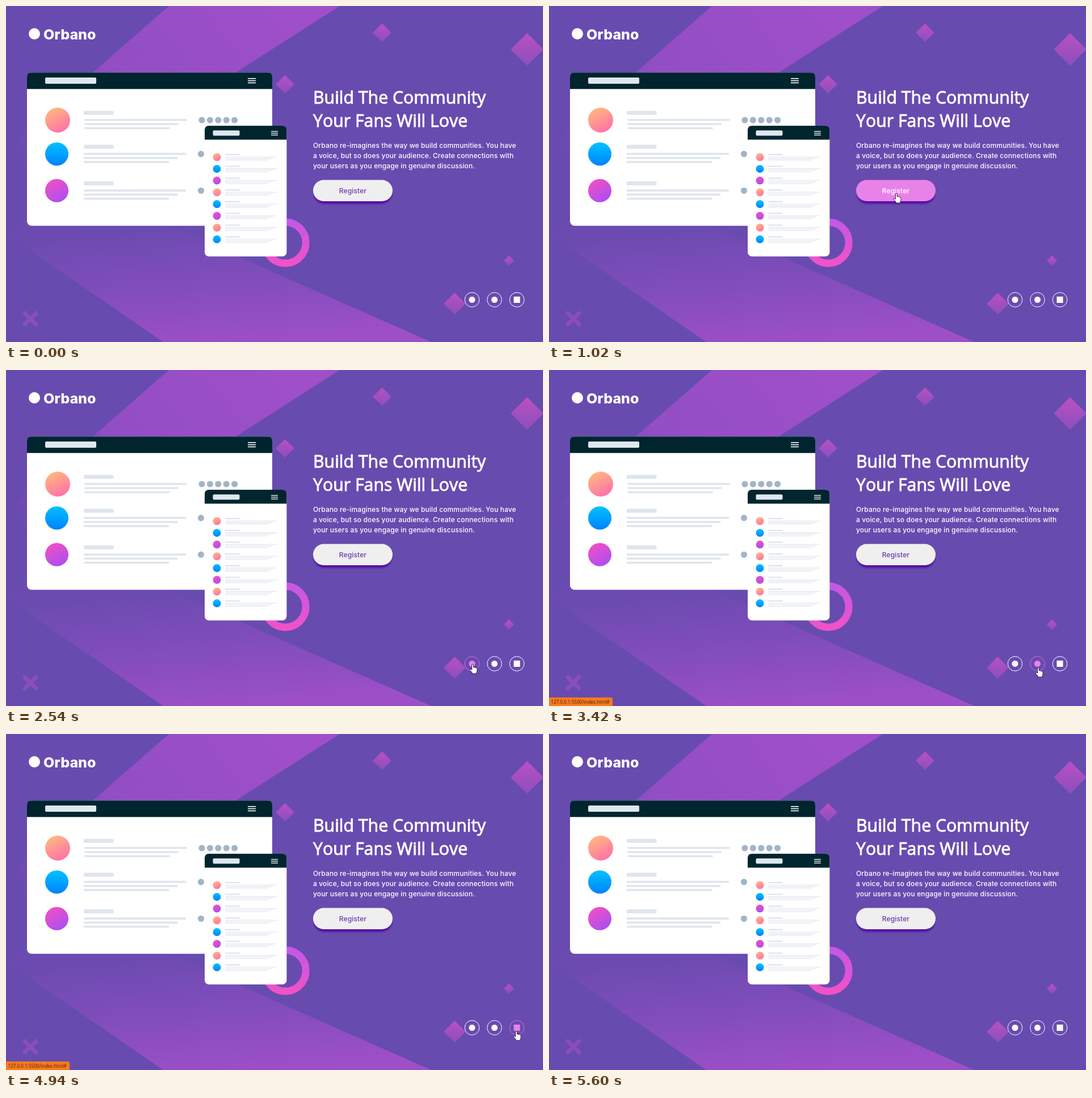
An HTML page that plays this animation: 946x592 px, repeating every 5.67 s.

```html
<!DOCTYPE html>
<html lang="en">
<head>
<meta charset="utf-8">
<title>Landing page</title>
<style>
  html, body { margin: 0; width: 100%; height: 100%; overflow: hidden; background: #684baf; }
  svg { display: block; width: 946px; height: 592px; }
  text { fill: #fff; font-family: Inter, sans-serif; }
  .logo { font-size: 25px; font-weight: 800; }
  .title { font: 400 30.25px "Open Sans", sans-serif; font-kerning: none; stroke: #fff; stroke-width: .9px; }
  .body { font-size: 12px; font-weight: 500; letter-spacing: .13px; }
  .status { font: 8.1px "Open Sans", sans-serif; fill: #3a2418; }
</style>
</head>
<body>
<svg id="stage" viewBox="0 0 946 592">
  <defs>
    <linearGradient id="top" gradientUnits="userSpaceOnUse" x1="470" y1="0" x2="60" y2="320">
      <stop offset="0" stop-color="#9e4fc9"/><stop offset=".55" stop-color="#924ec4"/><stop offset="1" stop-color="#684baf"/>
    </linearGradient>
    <linearGradient id="low" gradientUnits="userSpaceOnUse" x1="330" y1="385" x2="350" y2="600">
      <stop offset="0" stop-color="#6b4bb0"/><stop offset=".5" stop-color="#824dbc"/><stop offset="1" stop-color="#9d4fc8"/>
    </linearGradient>
    <linearGradient id="gem" x1="0" y1="0" x2="0" y2="1">
      <stop offset="0" stop-color="#b950c4"/><stop offset="1" stop-color="#8c4fbb"/>
    </linearGradient>
    <linearGradient id="ring" x1="0" y1="0" x2="0" y2="1">
      <stop offset="0" stop-color="#c458e4"/><stop offset="1" stop-color="#f052c8"/>
    </linearGradient>
    <linearGradient id="orange" x1=".2" y1="0" x2=".7" y2="1">
      <stop offset="0" stop-color="#ffbb7c"/><stop offset="1" stop-color="#ff70aa"/>
    </linearGradient>
    <linearGradient id="blue" x1="0" y1="0" x2="0" y2="1">
      <stop offset="0" stop-color="#00c2ff"/><stop offset="1" stop-color="#0082fd"/>
    </linearGradient>
    <linearGradient id="pink" x1=".2" y1="0" x2=".7" y2="1">
      <stop offset="0" stop-color="#f44fc2"/><stop offset="1" stop-color="#aa4ff2"/>
    </linearGradient>
    <filter id="soft" x="-20%" y="-40%" width="140%" height="200%"><feGaussianBlur stdDeviation="1.6"/></filter>
  </defs>

  <path fill="url(#top)" d="M287 0H588L408 115L60 337L0 251Z"/>
  <path fill="url(#low)" d="M0 401L120 310L290 389L749 592H277Z"/>
  <g id="gems" fill="url(#gem)"></g>
  <path d="M33 541L53 561M53 541L33 561" stroke="#8a4dbe" stroke-width="7" stroke-linecap="round"/>
  <circle cx="492" cy="417" r="36.2" fill="none" stroke="url(#ring)" stroke-width="13"/>

  <g id="desk"></g>
  <g id="phone"></g>

  <circle cx="50" cy="49" r="10" fill="#fff"/>
  <text class="logo" x="66" y="58.5">Orbano</text>

  <text class="title" x="541" y="172">Build The Community</text>
  <text class="title" x="541" y="213">Your Fans Will Love</text>
  <text class="body" x="541" y="250">Orbano re-imagines the way we build communities. You have</text>
  <text class="body" x="541" y="268">a voice, but so does your audience. Create connections with</text>
  <text class="body" x="541" y="286">your users as you engage in genuine discussion.</text>

  <rect x="542" y="311" width="138" height="37.5" rx="18.7" fill="#5210a2" filter="url(#soft)"/>
  <rect id="button" x="541" y="306.5" width="140" height="37.5" rx="18.7"/>
  <text id="label" class="body" x="611" y="330" text-anchor="middle">Register</text>

  <g id="social"></g>

  <g id="status">
    <path fill="#fa7a1e" d="M0 577H109Q112 577 112 580V592H0Z"/>
    <text class="status" x="3.5" y="587.5">127.0.0.1:5500/index.html#</text>
  </g>

  <g id="cursor" fill="#fff" stroke="#1c1630" stroke-width=".9" stroke-linejoin="round">
    <path id="arrow" d="M0 0V12.2L2.8 9.6L4.8 14.2L6.7 13.3L4.7 8.9H8.4Z"/>
    <path id="hand" d="M-1.4 1Q0 -1 1.4 1V6Q3 5 4 6.4Q5.6 5.6 6.3 7.1Q8 6.8 8 8.6V12Q8 14 6.7 15.5V17H-.7V15.6L-4.4 11Q-5.4 9.2 -3.8 8.8Q-2.6 8.8 -1.4 10.4Z"/>
  </g>
</svg>
<script>
const LOOP = 5670;
const $ = id => document.getElementById(id);

function add(parent, tag, attrs) {
  const el = document.createElementNS("http://www.w3.org/2000/svg", tag);
  for (const key in attrs) el.setAttribute(key, attrs[key]);
  return parent.appendChild(el);
}
const bar = (g, x, y, width, height, fill, rx = height / 2) =>
  add(g, "rect", { x, y, width, height, rx, fill });
const dot = (g, cx, cy, r, fill) => add(g, "circle", { cx, cy, r, fill });
const paints = ["url(#orange)", "url(#blue)", "url(#pink)"];

for (const [x, y, r] of [[662.5, 47, 16.3], [918, 76.5, 28.7], [491.5, 138, 16.3], [886, 448.5, 9], [790.5, 524.5, 19.3]])
  add($("gems"), "path", { d: `M${x} ${y - r}L${x + r} ${y}L${x} ${y + r}L${x - r} ${y}Z` });

function panel(g, x, y, w, h, r, head) {
  bar(g, x, y, w, h, "#fff", r);
  add(g, "path", {
    d: `M${x} ${y + head}V${y + r}Q${x} ${y} ${x + r} ${y}H${x + w - r}Q${x + w} ${y} ${x + w} ${y + r}V${y + head}Z`,
    fill: "#00252e"
  });
}

const desk = $("desk");
panel(desk, 37, 117.3, 432, 270, 8, 29);
bar(desk, 69, 126, 90, 11, "#dfe7ee", 2);
for (let i = 0; i < 3; i++) bar(desk, 426, 127 + i * 3.8, 14, 1.6, "#fff", 0);
[[91, 201, 22], [89.5, 260.7, 20.5], [89.5, 325.3, 20.5]].forEach(([x, y, r], i) => {
  const left = i ? 136.5 : 138;
  dot(desk, x, y, r, paints[i]);
  bar(desk, 137, y - 16.2, 52.5, 7, "#dfe5ec", 1.5);
  [181, 166, 151].forEach((w, k) => bar(desk, left, y - 2 + k * 7.2, w, 3.6, "#dfe5ec"));
  for (let k = 0; k < (i ? 1 : 5); k++) dot(desk, (i ? 343.5 : 345) + k * 14.4, y, 5.6, "#a3b4c7");
});

const phone = $("phone");
panel(phone, 350, 211, 144.4, 230.3, 7.5, 24.5);
bar(phone, 364.5, 219.3, 47, 9.2, "#dfe7ee", 2);
for (let i = 0; i < 3; i++) bar(phone, 467, 220.3 + i * 3.2, 12, 1.3, "#fff", 0);
for (let i = 0; i < 8; i++) {
  const y = 266.2 + i * 20.7;
  dot(phone, 371.5, y, 7, paints[i % 3]);
  bar(phone, 386, y - 5.4, 26, 2.3, "#dfe4ec");
  [91, 84, 77].forEach((w, k) => bar(phone, 386, y - .8 + k * 2.7, w, 1.3, "#e1e6ee"));
}

const icons = [821, 860.5, 900].map((x, i) => ({
  ring: add($("social"), "circle", { cx: x, cy: 517.5, r: 12.8, fill: "none", "stroke-width": 1 }),
  mark: i < 2 ? dot($("social"), x, 517.5, 5.5, "#fff") : bar($("social"), x - 5.5, 512, 11, 11, "#fff", 0)
}));

// Pointer path: time, x, y
const path = [
  [70, 562, 584], [620, 595, 406], [890, 612, 330], [1670, 612, 330], [2010, 758, 373],
  [2340, 822, 518], [3070, 822, 518], [3350, 862, 524], [3880, 862, 524],
  [4150, 899, 523], [4880, 899, 523], [5340, 912, 594]
];
// Hover spans: button, then the three icons
const hovers = [[820, 1740], [2290, 3140], [3210, 3950], [4020, 5070]];
const FADE = 200, STEP = 68;

const clamp = v => Math.max(0, Math.min(1, v));
const mix = (a, b, p) => `rgb(${a.map((v, i) => Math.round(v + (b[i] - v) * p))})`;
const white = [255, 255, 255], grey = [239, 239, 239], violet = [104, 56, 178];
const magenta = [232, 130, 232], edge = [206, 112, 220];

function pointer(t) {
  let i = 0;
  while (i < path.length - 2 && t >= path[i + 1][0]) i++;
  const [t0, x0, y0] = path[i], [t1, x1, y1] = path[i + 1];
  const n = Math.round((t1 - t0) / STEP);
  const p = Math.floor(clamp((t - t0) / (t1 - t0)) * n) / n;
  return [x0 + (x1 - x0) * p, y0 + (y1 - y0) * p];
}

function draw(t) {
  const glow = hovers.map(([on, off]) => clamp((t - on) / FADE) * (1 - clamp((t - off) / FADE)));
  $("button").style.fill = mix(grey, magenta, glow[0]);
  $("label").style.fill = mix(violet, white, glow[0]);
  icons.forEach(({ ring, mark }, i) => {
    ring.style.stroke = mix(white, edge, glow[i + 1]);
    mark.style.fill = mix(white, magenta, glow[i + 1]);
  });

  $("status").style.opacity = clamp((t - 2700) / 120) * (1 - clamp((t - 5270) / 130));

  const [x, y] = pointer(t);
  const over = hovers.some(([on, off]) => t >= on && t < off);
  $("cursor").style.display = t >= 70 && t < 5340 ? "" : "none";
  $("cursor").setAttribute("transform", `translate(${x} ${y})`);
  $("arrow").style.display = over ? "none" : "";
  $("hand").style.display = over ? "" : "none";
}

const start = performance.now();
function tick() {
  draw((performance.now() - start) % LOOP);
  requestAnimationFrame(tick);
}
tick();
</script>
</body>
</html>
```
